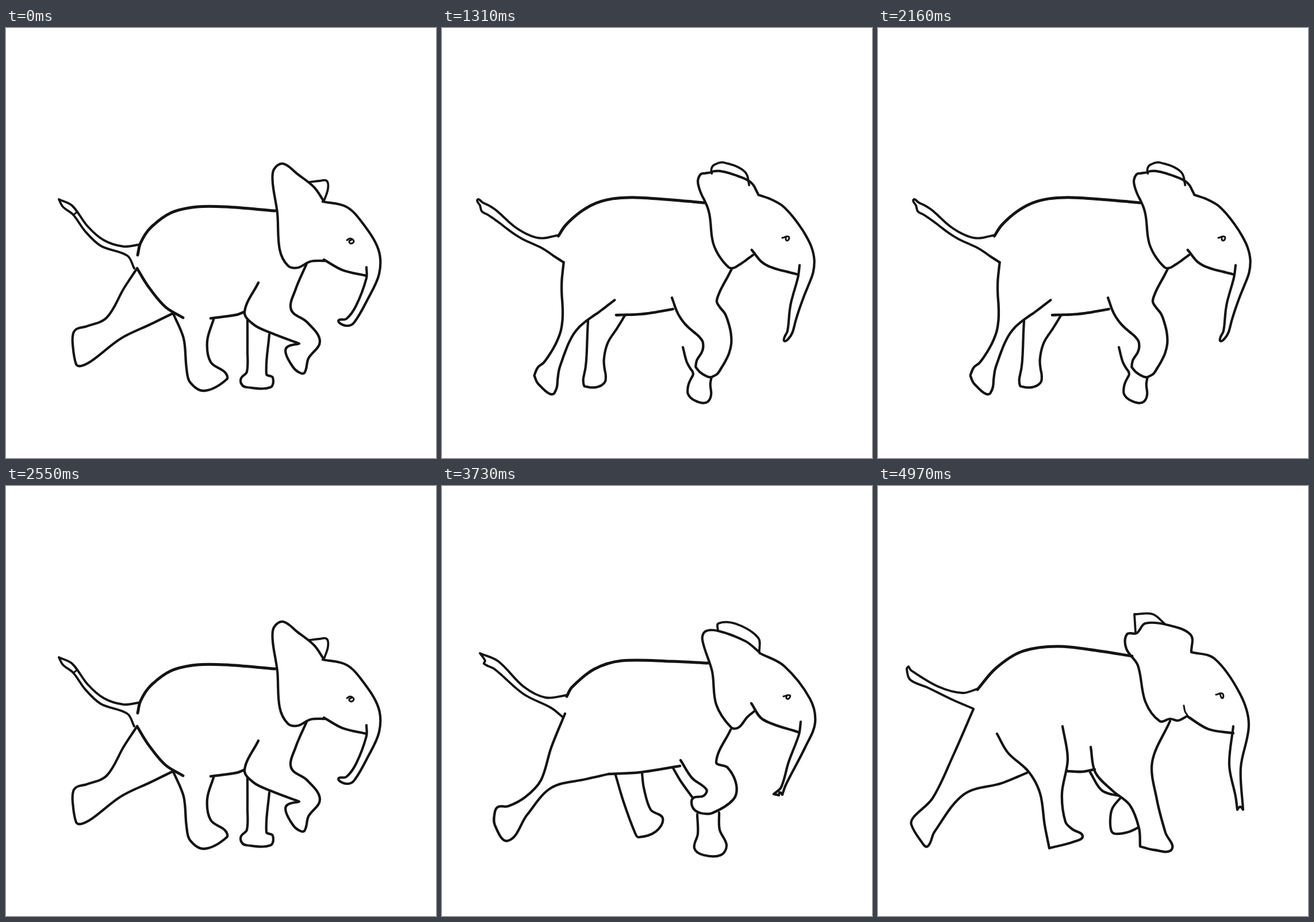
Write an HTML page that moves like this. It is 748 px wide and 748 px high and loops after 5.1 s.

```html
<!DOCTYPE html>
<html lang="en">
<head>
<meta charset="utf-8">
<title>Running elephant</title>
<style>
html, body { margin: 0; width: 100%; height: 100%; overflow: hidden; background: #fff; }
svg { display: block; width: 100%; height: 100%; }
path { fill: none; stroke: #141416; stroke-linecap: round; stroke-linejoin: round; }
path.solid { fill: #fff; }
</style>
</head>
<body>
<svg id="stage" viewBox="0 0 748 748"></svg>
<script>
const LOOP = 850;
const starts = [0, 130, 230, 330, 460, 590, 720];
// How far the feet press down in each pose.
const sink = [0, 14, 12, 0, 24, 20, 0];
const stage = document.getElementById("stage");
const groups = starts.map(() => add(stage, "g"));
const lerp = (a, b, t) => a + (b - a) * t;
const dist = (a, b) => Math.hypot(b[0] - a[0], b[1] - a[1]);

function add(parent, tag) {
  return parent.appendChild(document.createElementNS("http://www.w3.org/2000/svg", tag));
}

// "!" marks a sharp corner, "*" a joint that is matched between key poses.
function parse(text) {
  return text.split(" ").flatMap(word => {
    const p = word.replace(/[!*]/g, "").split(",").map(Number);
    p.joint = word.includes("*");
    return word.includes("!") ? [p.slice(), p] : [p];
  });
}

// Cubic control points between neighbours.
function cubics(pts) {
  const at = i => pts[Math.max(0, Math.min(pts.length - 1, i))];
  const handle = (i, len) => {
    const a = at(i - 1), b = at(i + 1), k = len / (dist(a, b) || 1);
    return [(b[0] - a[0]) * k, (b[1] - a[1]) * k];
  };
  return pts.slice(1).map((b, i) => {
    const a = pts[i], len = dist(a, b) / 3;
    const u = handle(i, len), v = handle(i + 1, len);
    return [a, [a[0] + u[0], a[1] + u[1]], [b[0] - v[0], b[1] - v[1]], b];
  });
}

function pathOf(pts) {
  return "M" + pts[0] + cubics(pts).map(c =>
    "C" + c.slice(1).flat().map(n => n.toFixed(1)).join(" ")).join("");
}

function spread(line, count) {
  const sums = [0];
  for (let i = 1; i < line.length; i++) sums.push(sums[i - 1] + dist(line[i - 1], line[i]));
  const out = [];
  for (let k = 0, i = 1; k <= count; k++) {
    const goal = sums[sums.length - 1] * k / count;
    while (i < line.length - 1 && sums[i] < goal) i++;
    const t = (goal - sums[i - 1]) / (sums[i] - sums[i - 1] || 1);
    out.push([lerp(line[i - 1][0], line[i][0], t), lerp(line[i - 1][1], line[i][1], t)]);
  }
  return out;
}

// Even samples between joints, so two key poses can be mixed.
function sample(pts) {
  const pieces = [[pts[0]]];
  for (const c of cubics(pts)) {
    const piece = pieces[pieces.length - 1];
    for (let k = 1; k <= 8; k++) {
      const t = k / 8, s = 1 - t;
      piece.push([0, 1].map(n => s * s * s * c[0][n] + 3 * s * s * t * c[1][n]
        + 3 * s * t * t * c[2][n] + t * t * t * c[3][n]));
    }
    if (c[3].joint) pieces.push([c[3]]);
  }
  return pieces.flatMap((piece, i) => spread(piece, 14).slice(i ? 1 : 0));
}

function stroke(i, pts, width, solid) {
  const path = add(groups[i], "path");
  path.setAttribute("d", pathOf(pts));
  path.setAttribute("stroke-width", width);
  if (solid) path.setAttribute("class", "solid");
}

// Draws one part in all poses from its three key poses.
function part(width, keys, { leg = false, solid = false } = {}) {
  const exact = keys.map(parse), even = exact.map(sample);
  return starts.map((_, i) => {
    const k = Math.floor(i / 3), t = i % 3 / 3;
    const pts = t ? even[k].map((p, n) => p.map((v, axis) => lerp(v, even[k + 1][n][axis], t))) : exact[k];
    if (leg && t) for (const p of pts) p[1] += sink[i] * Math.max(0, (p[1] - 500) / 130);
    stroke(i, pts, width, solid);
    return pts;
  });
}

function detail(i, width, text) {
  stroke(i, parse(text), width);
}

part(4.2, [
  "226,421 205,453 175,504 140,519 124,523 117,531* 116,550 122,585 130,588* 149,579 200,540 250,516 289,497",
  "302,503 316,550 336,604 342,611* 372,601 384,578* 363,563 351,525 348,500",
  "166,388 132,466 95,543 62,576 58,589* 75,618 86,627* 98,602 150,536 215,517 259,499"
], { leg: true });

part(4.2, [
  "420,506 420,560 419,598 409,609* 410,620 419,625 460,625 464,608* 453,602 458,533",
  "444,571 445,605 439,630* 455,642 485,642 495,625* 483,598 482,568",
  "369,498 390,530 424,540! 408,560 404,580* 406,600 413,605* 435,602 455,593"
], { leg: true });

const thighs = part(4.3, [
  "291,497 309,540 314,592 320,616* 345,631 384,611* 381,599 356,581 350,545 361,507",
  "214,396 190,455 172,512 145,541 115,557 98,558 92,567* 92,590 115,617* 148,572 190,525 250,510 290,501",
  "207,431 226,464 262,497 282,535 290,590 298,630!* 340,619 356,609* 338,597 326,584 320,535 330,475 321,418"
], { leg: true, solid: true });

part(4.3, [
  "439,443 415,494 431,516 460,530 510,549! 489,555 487,567* 498,588 508,598 519,600* 526,575 546,545 524,512 496,490 504,454 523,410",
  "415,477 435,508 460,528 455,539 438,542 434,550* 438,562 450,569* 470,569 507,545 512,520 497,490 477,480 502,424",
  "370,454 378,498 408,530 438,555 454,595 456,627!* 480,633 511,632* 500,603 485,545 477,480 508,409"
], { leg: true, solid: true });

part(4.6, [
  "356,505 400,499 414,494",
  "290,501 345,498 414,487",
  "329,496 355,497 377,493"
]);

part(5, [
  "229,395 234,374 251,348 288,321 333,311 382,311 468,318",
  "217,366 226,350 264,319 312,304 400,305 463,308",
  "173,354 205,317 250,288 312,279 385,287 442,296"
]);

const tails = part(3.9, [
  "231,377 204,380 170,369 142,345 115,309 92,298!* 99,311 117,325 138,354 165,379 211,396 223,418",
  "217,364 180,368 142,349 98,305 66,291!* 75,304 73,309 92,319 142,362 190,386 210,402",
  "173,353 147,360 105,349 58,321 53,314!* 50,318 56,337 85,350 130,372 165,387"
]);

// Between key poses the rump joins the tail to the thigh.
starts.forEach((_, i) => {
  if (i % 3) stroke(i, [tails[i][tails[i].length - 1], thighs[i][0]], 4.3);
});

part(4.2, [
  "552,300 536,277 507,254 482,236* 466,246 464,270 472,322 476,385 490,413* 507,417 530,406 556,405",
  "552,289 528,270 480,252 458,253* 453,268 470,323 477,380 503,420* 516,420 531,402 543,392",
  "545,288 544,259 505,242 465,239 450,256 433,258* 432,283 452,312 465,375 490,409* 508,405 522,408 538,400"
]);

part(3.8, [
  "528,268 545,266 558,266 560,280 553,301",
  "480,252 481,239 512,240 550,264 552,290",
  "448,255 446,223! 478,223 499,240"
]);

part(4.2, [
  "551,302 592,311 620,339 648,386 649,428 628,474 605,513 593,518* 580,513 579,508 592,506 609,483 627,435 627,416",
  "553,291 595,313 640,370 649,412 632,454 598,520 592,537! 588,533* 586,538! 577,536! 590,524 603,480 621,432 624,410",
  "545,289 585,300 630,362 645,415 631,490 635,563! 630,558* 625,563! 622,540 611,485 618,418"
]);

part(4.4, [
  "553,403 585,421 627,431",
  "538,378 558,406 619,428",
  "540,402 575,423 618,430"
]);

part(3, [
  "593,369 599,366 605,371 600,375 597,371 602,368",
  "594,366 605,364 603,370 599,369 600,364",
  "588,363 599,361 599,369 595,362"
]);

detail(0, 4.8, "228,418 247,449 277,485 308,504");
detail(0, 3, "115,309 123,319 117,325");
detail(3, 4.2, "401,489 415,513 435,541");
detail(6, 3, "532,382 534,392 539,400");

function draw(ms) {
  const t = ms % LOOP;
  const current = starts.filter(s => s <= t).length - 1;
  groups.forEach((g, i) => g.setAttribute("visibility", i === current ? "visible" : "hidden"));
}

const begin = performance.now();
function tick() {
  draw(performance.now() - begin);
  requestAnimationFrame(tick);
}
draw(0);
requestAnimationFrame(tick);
</script>
</body>
</html>
```
